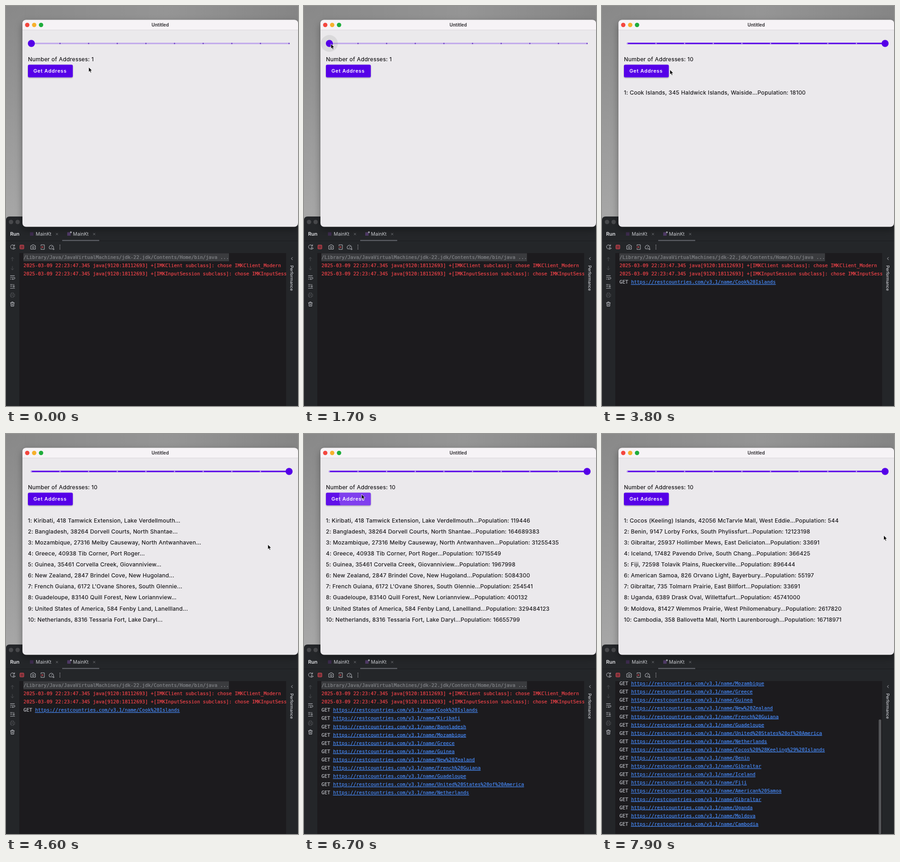
An HTML page for the animation above (8 s loop, 639 by 876 pixels).

```html
<!DOCTYPE html>
<html lang="en">
<head>
<meta charset="utf-8">
<title>Address list</title>
<style>
  html, body { margin: 0; width: 100%; height: 100%; overflow: hidden; background: #1c1b1e; }
  svg { display: block; width: 639px; height: 876px; }
  text { font-family: Inter, sans-serif; white-space: pre; }
  .ui { font-size: 12.2px; letter-spacing: .28px; fill: #0c0b0e; stroke: #0c0b0e; stroke-width: .12; }
  .tab { font-size: 10.4px; fill: #d0d2d7; }
  #console text { font: 10.52px "DejaVu Sans Mono", monospace; fill: #c4c6cc; stroke: #c4c6cc; stroke-width: .2; }
  #console .error { fill: #f5444a; stroke: #f5444a; }
  #console .command { fill: #85878b; stroke: #85878b; }
  #console .link { fill: #478af8; stroke: #478af8; text-decoration: underline; }
  .icon { fill: none; stroke: #bfc1c7; stroke-width: 1; stroke-linecap: round; stroke-linejoin: round; }
  .dim { stroke: #4c4e53; }
  .red { stroke: #db4b55; }
</style>
</head>
<body>
<svg viewBox="0 0 639 876">
  <defs>
    <linearGradient id="desk" x2="1" y2="0">
      <stop stop-color="#888"/><stop offset=".55" stop-color="#959595"/><stop offset="1" stop-color="#858585"/>
    </linearGradient>
    <linearGradient id="side" x2="0" y2="1">
      <stop stop-color="#a8a8a8" stop-opacity="0"/><stop offset="1" stop-color="#a8a8a8"/>
    </linearGradient>
    <filter id="windowShadow" x="-10%" y="-10%" width="120%" height="120%">
      <feDropShadow dx="0" dy="6" stdDeviation="8" flood-opacity=".35"/>
    </filter>
    <filter id="softShadow" x="-20%" y="-30%" width="140%" height="180%">
      <feDropShadow dx="0" dy="1.3" stdDeviation="1.3" flood-opacity=".35"/>
    </filter>
    <clipPath id="consoleClip"><rect x="29" y="541" width="584" height="335"/></clipPath>
    <clipPath id="buttonClip"><rect x="48" y="128.6" width="98.2" height="27.6" rx="3"/></clipPath>
  </defs>

  <rect width="639" height="876" fill="url(#desk)"/>
  <rect width="40" height="480" fill="url(#side)"/>

  <!-- IDE panel -->
  <path d="M0 876V469q0-8 8-8H639V876Z" fill="#242629"/>
  <circle cx="11" cy="473" r="4.8" fill="#48494c"/>
  <circle cx="25.5" cy="473" r="4.8" fill="#48494c"/>
  <path d="M0 514.5H639" stroke="#1b1c1f"/>
  <rect x="29" y="541" width="584" height="335" fill="#1c1b1e"/>
  <rect x="123" y="512.5" width="81" height="2" fill="#666970"/>
  <text x="9" y="503" font-size="10.9" font-weight="600" fill="#e4e5e9">Run</text>
  <text class="tab" x="65" y="503">MainKt</text>
  <text class="tab" x="146.5" y="503">MainKt</text>
  <rect x="52.5" y="495.5" width="7.5" height="7.5" fill="#3d2c4e"/>
  <rect x="134" y="495.5" width="7.5" height="7.5" fill="#503b68"/>
  <circle cx="142" cy="495.5" r="2" fill="#a4a7ad"/>
  <path class="icon" stroke-opacity=".5" d="M109.5 497.5l4 4m0-4l-4 4M191 497.5l4 4m0-4l-4 4"/>

  <g class="icon">
    <path d="M18.5 525.5A4.5 4.5 0 1 0 15 532M18.8 522.5v3.2h-3.2M16.5 528.5l4 2.2-4 2.2Z"/>
    <rect class="red" x="30.5" y="523.5" width="8.5" height="8.5" rx="1" fill="#7c3038"/>
    <path d="M54.5 525h2l1-2h4l1 2h2v7.5h-10ZM61.5 528.5a2 2 0 1 1-4 0a2 2 0 1 1 4 0"/>
    <path d="M76.5 525v-2h7.5v10h-7.5v-2"/>
    <path class="red" d="M76 528h5m-2-2l2 2-2 2"/>
    <path d="M95 531.5a5 5 0 1 1 8.5 0ZM99 529l2.5-3M103 533.5h2v-2"/>
    <path stroke-width="1.8" d="M118 523.8v0m0 4v0m0 4v0"/>
    <path class="dim" d="M14 558.5v-8m-3 3l3-3 3 3M14 570v8m-3-3l3 3 3-3"/>
    <path d="M9.5 590.5h9M9.5 594h8q2 0 2 2t-2 2h-4m1.5-1.5l-1.5 1.5 1.5 1.5M9.5 598h2"/>
    <path d="M9.5 610h5M9.5 613.5h4M9.5 618h9.5M17 609.5v6m-2-2l2 2 2-2"/>
    <path class="dim" d="M11.5 631v-3h5v3M11.5 636h-2v-5h9.5v5h-2M11.5 634h5v4h-5Z"/>
    <path d="M9.5 650h9M12.5 650v-2h3v2M10.5 650l.5 7.5h6l.5-7.5M13 652.5v3m2-3v3"/>
    <path d="M627 550.5l-2.7 2.7 2.7 2.7"/>
  </g>
  <text transform="translate(622.3 568) rotate(90)" font-size="9" font-weight="500" fill="#d0d2d7">Performance</text>

  <g clip-path="url(#consoleClip)">
    <g id="console"><rect x="38" y="541.5" width="450" height="17.5" fill="#3a3b3e"/></g>
    <rect id="scrollbar" x="605.5" width="5.5" rx="2" fill="#555659"/>
  </g>

  <!-- App window -->
  <rect x="36" y="30.5" width="603" height="453" rx="8" fill="#ebe9ec" filter="url(#windowShadow)"/>
  <path d="M36 52V38.5q0-8 8-8H631q8 0 8 8V52Z" fill="#f6f3f6"/>
  <path d="M36 52.5H639" stroke="#d9d6da"/>
  <circle cx="46.5" cy="41.5" r="4.8" fill="#f4473f"/>
  <circle cx="61.7" cy="41.5" r="4.8" fill="#f7b02c"/>
  <circle cx="76.7" cy="41.5" r="4.8" fill="#1fad3c"/>
  <text x="337.5" y="44.8" text-anchor="middle" font-size="9.8" font-weight="700" fill="#3c3a3e">Untitled</text>

  <g stroke-width="3" stroke-linecap="round">
    <path d="M55.5 82H619.5" stroke="#bfa6eb"/>
    <path id="active" stroke="#5600e8"/>
  </g>
  <g id="ticks"></g>
  <circle id="halo" cx="55.5" cy="82" r="18.5"/>
  <circle id="thumb" cy="82" r="7.7" fill="#5600e8"/>

  <text class="ui" id="count" x="48" y="121.3"></text>
  <rect x="48" y="128.6" width="98.2" height="27.6" rx="3" fill="#5600e8" filter="url(#softShadow)"/>
  <rect id="hover" x="48" y="128.6" width="98.2" height="27.6" rx="3" fill="#fff" fill-opacity=".06"/>
  <circle id="ripple" fill="#fff" clip-path="url(#buttonClip)"/>
  <text x="60" y="146.4" font-size="10.8" font-weight="600" letter-spacing=".77" fill="#fff">Get Address</text>
  <g id="rows"></g>

  <g id="cursor">
    <circle id="ring" cx=".5" cy="1" r="15" fill="none" stroke="#0b0b0c" stroke-width="2.2"/>
    <path d="M0 0V10.6L2.4 8.4 4 12.2 5.9 11.4 4.3 7.7H7.6Z" fill="#050505" stroke="#fff" stroke-width=".8"/>
  </g>
</svg>
<script>
const LOOP = 8000, STEP = 100;
const LEFT = 55.5, GAP = 564 / 9, TRACK_Y = 82;
const LINE = 18.1, ROW = 24.13;
const $ = id => document.getElementById(id);

function add(parent, tag, attrs, content = '') {
  const node = document.createElementNS('http://www.w3.org/2000/svg', tag);
  for (const key in attrs) node.setAttribute(key, attrs[key]);
  node.textContent = content;
  return parent.appendChild(node);
}
function set(id, attrs) {
  for (const key in attrs) $(id).setAttribute(key, attrs[key]);
}
const show = (id, visible) => set(id, { visibility: visible ? 'visible' : 'hidden' });

// Each entry: country | rest of the address | population
const parse = text => text.trim().split('\n').map(line => line.trim().split('|'));
const batches = [
  { press: 1950, shown: 2000, get: 2100, loaded: 2200, x: 100, y: 142, items: parse(`
    Cook Islands|345 Haldwick Islands, Waiside|18100`) },
  { press: 4050, shown: 4200, get: 4700, loaded: 4900, x: 110, y: 142, items: parse(`
    Kiribati|418 Tamwick Extension, Lake Verdellmouth|119446
    Bangladesh|38264 Dorvell Courts, North Shantae|164689383
    Mozambique|27316 Melby Causeway, North Antwanhaven|31255435
    Greece|40938 Tib Corner, Port Roger|10715549
    Guinea|35461 Corvella Creek, Giovanniview|1967998
    New Zealand|2847 Brindel Cove, New Hugoland|5084300
    French Guiana|6172 L'Ovane Shores, South Glennie|254541
    Guadeloupe|83140 Quill Forest, New Loriannview|400132
    United States of America|584 Fenby Land, Lanellland|329484123
    Netherlands|8316 Tessaria Fort, Lake Daryl|16655799`) },
  { press: 6550, shown: 6800, get: 7200, loaded: 7400, x: 126, y: 139, items: parse(`
    Cocos (Keeling) Islands|42056 McTarvle Mall, West Eddie|544
    Benin|9147 Lorby Forks, South Phylissfurt|12123198
    Gibraltar|25937 Hollimber Mews, East Deliciaton|33691
    Iceland|17482 Pavendo Drive, South Chang|366425
    Fiji|72598 Tolavik Plains, Rueckerville|896444
    American Samoa|826 Orvano Light, Bayerbury|55197
    Gibraltar|735 Tolmarn Prairie, East Billfort|33691
    Uganda|6389 Drask Oval, Willettafurt|45741000
    Moldova|81427 Wemmos Prairie, West Philomenabury|2617820
    Cambodia|358 Ballovetta Mall, North Laurenborough|16718971`) },
];

// Keys: time, then values; eased between neighbours
const cursorKeys = [
  [0, 181, 134], [1200, 181, 134], [1600, 59, 83], [1750, 59, 83], [1950, 100, 142], [2050, 100, 142],
  [2350, 60, 82], [2400, 60, 82], [2800, 567, 103], [3000, 632, 108], [3300, 632, 108],
  [3900, 110, 142], [4200, 110, 142], [4550, 573, 242], [5900, 573, 242],
  [6450, 126, 132], [6850, 126, 132], [7500, 616.5, 222], [LOOP, 616.5, 222]];
const thumbKeys = [[0, LEFT], [2400, LEFT], [2800, 550], [3000, 619.5], [LOOP, 619.5]];
const presses = [[1950, 2050], [2400, 3100], [4050, 4150], [6500, 6650]];

const clamp = v => Math.min(1, Math.max(0, v));
function sample(keys, t) {
  const i = keys.findIndex(key => key[0] > t);
  const [a, b] = [keys[i - 1], keys[i]];
  const p = (t - a[0]) / (b[0] - a[0]), eased = p * p * (3 - 2 * p);
  return a.slice(1).map((v, k) => v + (b[k + 1] - v) * eased);
}

// Console lines
const lines = [];
function addLine(time, fill) {
  const node = add($('console'), 'text', { x: 38.3, y: 554 + LINE * lines.length });
  fill(node);
  lines.push({ time, node });
}
const plain = (cls, content) => addLine(0, node => {
  node.setAttribute('class', cls);
  node.textContent = content;
});
const stamp = '2025-03-09 22:23:47.345 java[9120:18112693] ';
plain('command', '/Library/Java/JavaVirtualMachines/jdk-22.jdk/Contents/Home/bin/java ...');
plain('error', stamp + '+[IMKClient subclass]: chose IMKClient_Modern');
plain('error', stamp + '+[IMKInputSession subclass]: chose IMKInputSession_Modern');
const encode = name => encodeURIComponent(name).replace('(', '%28').replace(')', '%29');
for (const { get, items } of batches) {
  items.forEach(([country], i) => addLine(get + i * 20, node => {
    node.textContent = 'GET ';
    add(node, 'tspan', { class: 'link' }, 'https://restcountries.com/v3.1/name/' + encode(country));
  }));
}

const rows = Array.from({ length: 10 }, (_, i) =>
  add($('rows'), 'text', { class: 'ui', x: 48, y: 193.5 + i * ROW }));
const ticks = Array.from({ length: 10 }, (_, i) =>
  add($('ticks'), 'circle', { cx: LEFT + i * GAP, cy: TRACK_Y, r: 1.5 }));

function drawSlider(t) {
  const [x] = sample(thumbKeys, t);
  set('thumb', { cx: x });
  set('active', { d: `M${LEFT} ${TRACK_Y}H${x}` });
  ticks.forEach((tick, i) => tick.setAttribute('fill', LEFT + i * GAP <= x ? '#c0a3f2' : '#6f40c4'));
  $('count').textContent = 'Number of Addresses: ' + (Math.floor((x - LEFT) / GAP + 1e-6) + 1);
  const hover = clamp((t - 1500) / 100) * clamp((1900 - t) / 100);
  set('halo', { 'fill-opacity': .07 * hover });
}

function drawRows(t) {
  const batch = batches.findLast(b => t >= b.shown);
  rows.forEach((row, i) => {
    const item = batch?.items[i];
    const population = item && t >= batch.loaded + i * 20 ? 'Population: ' + item[2] : '';
    row.textContent = item ? `${i + 1}: ${item[0]}, ${item[1]}...${population}` : '';
  });
}

function drawConsole(t) {
  let shown = 0;
  for (const { time, node } of lines) {
    const visible = t >= time;
    node.setAttribute('visibility', visible ? 'visible' : 'hidden');
    shown += visible;
  }
  const offset = Math.max(0, 112.4 + (shown - lines.length) * LINE);
  const view = 335, scale = view / (view + offset);
  set('console', { transform: `translate(0 ${-offset})` });
  set('scrollbar', { y: 541 + offset * scale, height: view * scale });
  show('scrollbar', offset > 0);
}

function drawPointer(t) {
  const [x, y] = sample(cursorKeys, t);
  set('cursor', { transform: `translate(${x} ${y})` });
  show('ring', presses.some(([from, to]) => t >= from && t < to));
  show('hover', x > 48 && x < 146 && y > 128 && y < 156);
  const batch = batches.findLast(b => t >= b.press);
  const age = batch ? t - batch.press : LOOP;
  set('ripple', {
    cx: batch?.x ?? 0, cy: batch?.y ?? 0, r: 18 + age * .21,
    'fill-opacity': .2 * clamp((400 - age) / 150),
  });
}

function frame(now) {
  const t = Math.floor(now % LOOP / STEP) * STEP;
  drawSlider(t);
  drawRows(t);
  drawConsole(t);
  drawPointer(t);
  requestAnimationFrame(frame);
}
frame(0);
</script>
</body>
</html>
```
